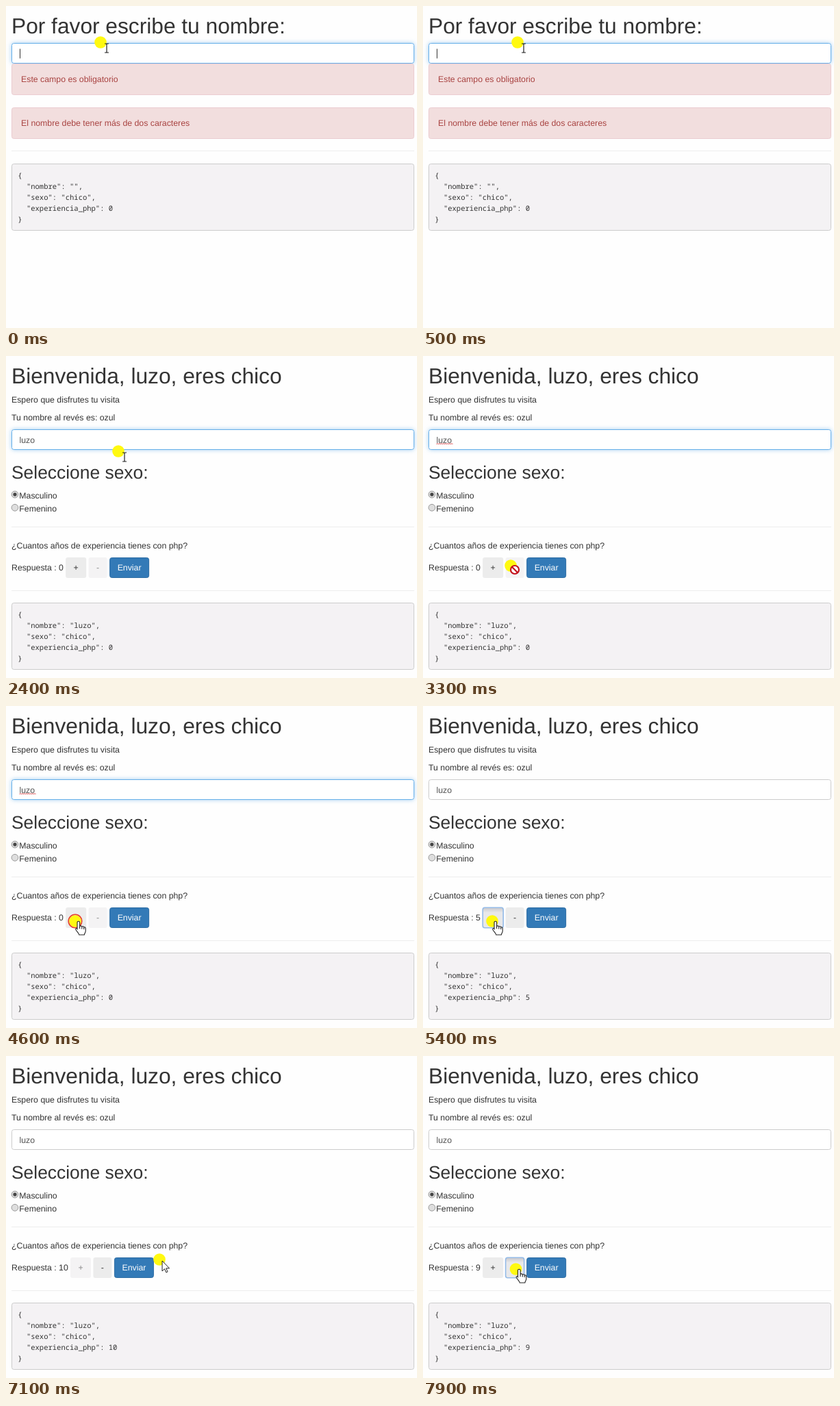
Animation of 600 by 470 pixels, one loop 8 s. Source, as an HTML page:

```html
<!DOCTYPE html>
<html lang="es">
<head>
<meta charset="utf-8">
<style>
  html, body { margin: 0; width: 100%; height: 100%; overflow: hidden; background: #fefefe; }
  svg { display: block; width: 600px; height: 470px; }
  text { font: 12.31px "Liberation Sans", Arial, sans-serif; fill: #333; white-space: pre; text-rendering: geometricPrecision; }
  .h1 { font-size: 31.7px; }
  .h2 { font-size: 26.4px; }
  .field { fill: #555; }
  .error { fill: #a94442; }
  .code { font: 10.52px "Noto Sans Mono", "DejaVu Sans Mono", monospace; }
  .glow { filter: drop-shadow(0 0 3px rgba(102, 175, 233, .6)); }
</style>
</head>
<body>
<svg id="stage" viewBox="0 0 600 470"></svg>
<script>
const LOOP = 8000, STEP = 100;
const stage = document.getElementById('stage');

// time, spot x, spot y, pointer shape from then on
const path = [
  [0, 138, 53, 'beam'], [2000, 138, 53, 'beam'], [2200, 146, 82, 'beam'],
  [2400, 164, 139, 'beam'], [2500, 185, 215, 'arrow'], [2650, 230, 330, 'arrow'],
  [2750, 239, 392, 'beam'], [2900, 197, 391, 'beam'], [3100, 160, 345, 'arrow'],
  [3300, 128, 306, 'no'], [3800, 138, 314, 'no'], [3900, 138, 314, 'no'],
  [4150, 112, 316, 'hand'], [4300, 101, 314, 'hand'], [6000, 101, 314, 'hand'],
  [6200, 100, 306.5, 'no'], [6300, 100, 306.5, 'no'], [6400, 135, 304, 'hand'],
  [6500, 168, 299, 'hand'], [6600, 168, 299, 'hand'], [6800, 238, 288, 'arrow'],
  [7100, 224, 297, 'arrow'], [7300, 160, 304, 'hand'], [7500, 137, 307, 'hand'],
  [7600, 135.5, 311, 'hand'], [8000, 135.5, 311, 'hand']
];

const text = (x, y, s, cls = '', more = '') => `<text x="${x}" y="${y}" class="${cls}" ${more}>${s}</text>`;
const box = (x, y, w, h, fill, line = 'none', more = '') =>
  `<rect x="${x}" y="${y}" width="${w}" height="${h}" rx="3" fill="${fill}" stroke="${line}" ${more}/>`;
const rule = y => `<path d="M8 ${y}H596" stroke="#eee"/>`;
const alertBox = (y, s) => box(8.5, y + .5, 587, 45, '#f2dede', '#ebccd1') + text(22.1, y + 27.2, s, 'error');

function input(y, name, t) {
  const focus = t < 4700, end = 19.5 + [0, 3, 10, 17, 24.5][name.length];
  let s = box(8.5, y + .5, 587, 29, '#fff', focus ? '#66afe9' : '#ccc', focus ? 'class="glow"' : '');
  s += text(19.5, y + 19.5, name, 'field');
  const sinceKey = t < 1600 ? 0 : t - 1600;
  if (t < 4100 && sinceKey % 1000 < 500)
    s += `<path d="M${Math.round(end) + .5} ${y + 8.5}v14" stroke="#333"/>`;
  if (focus && t >= 2600)
    s += `<path d="M19.5 ${y + 22}${'l1.5-1.5 1.5 1.5'.repeat(8)}" fill="none" stroke="#d8383c" stroke-width=".9"/>`;
  return s;
}

function code(y, name, years) {
  const lines = ['{', `  "nombre": "${name}",`, '  "sexo": "chico",', `  "experiencia_php": ${years}`, '}'];
  return box(8.5, y + .5, 587, 97, '#f4f2f4', '#ccc') +
    lines.map((l, i) => text(17.3, y + 21.2 + i * 15.85, l, 'code')).join('');
}

function button(x, y, w, label, off, focus) {
  let s = box(x, y, w, 30, off ? '#f4f3f4' : '#ececec');
  if (focus) s += box(x, y + .3, w, 29.4, 'url(#pressed)', '#94bbe8', 'stroke-width="1.6"');
  return s + text(x + w / 2, y + 19, label, '', `text-anchor="middle" opacity="${off ? .55 : 1}"`);
}

function radio(y, label, on) {
  return `<circle cx="13" cy="${y - 5.4}" r="4.9" fill="#dedede" stroke="#9a9a9a"/>` +
    (on ? `<circle cx="13" cy="${y - 5.4}" r="2.6" fill="#444"/>` : '') + text(19.3, y, label);
}

function form(d, years, t) {
  const x = years > 9 ? 94 : 87.2, y = 294 + d;
  return text(8, 178.9 + d, 'Seleccione sexo:', 'h2') +
    radio(207.5 + d, 'Masculino', true) + radio(226.7 + d, 'Femenino', false) +
    rule(249.5 + d) +
    text(8, 280.8 + d, '¿Cuantos años de experiencia tienes con php?') +
    text(8, 312.5 + d, 'Respuesta : ' + years) +
    button(x, y, 30, '+', years > 9, t >= 4700 && years < 10 && t < 6300) +
    button(x + 33.4, y, 27, '-', years < 1, t >= 7600) +
    box(x + 64.4, y + .5, 57, 29, '#337ab7', '#2e6da4') +
    text(x + 92.9, y + 19, 'Enviar', '', 'text-anchor="middle" style="fill:#fff"') +
    rule(342.5 + d);
}

function pointer(t) {
  const i = path.findIndex((p, k) => t >= p[0] && t < path[k + 1][0]);
  const [t0, x0, y0, shape] = path[i], [t1, x1, y1] = path[i + 1];
  const f = (t - t0) / (t1 - t0), x = x0 + (x1 - x0) * f, y = y0 + (y1 - y0) * f;
  const down = (t >= 4600 && t < 6200 && (t - 4600) % 165 < 85) || (t >= 7600 && t < 7800);
  const shapes = {
    beam: '<path transform="translate(9 8.5)" d="M-3-6.5h2q1 0 1 1 0-1 1-1h2M0-5.5V5.5M-3 6.5h2q1 0 1-1 0 1 1 1h2" fill="none" stroke="#222" stroke-width="1.2"/>',
    no: '<g transform="translate(6 6)" stroke="#c4101c" stroke-width="2.2"><circle r="6" fill="#fff"/><path d="M-4.2-4.2 4.2 4.2"/></g>',
    hand: '<path transform="translate(5 -.5)" d="M-2 2.5a1.8 1.8 0 0 1 3.6 0v5.5c1-1 3-.6 3.2.6 1-.8 2.6-.4 2.9.9 1.2-.6 2.5.2 2.5 1.6v4c0 2-1.6 3-1.9 5.4h-7.6c0-2-3.2-4.6-4.8-7.6-.8-1.6 1-2.6 2.1-1zM1.6 8v3.5M4.8 9v3M7.7 10v2.5" fill="#fff" stroke="#222" stroke-width="1.1"/>',
    arrow: '<path transform="translate(4 2)" d="M0 0v15l3.5-3.3 2.3 5.2 2.2-1-2.3-5h4.8z" fill="#fff" stroke="#222"/>'
  };
  return `<g transform="translate(${x} ${y})"><circle r="8.8" fill="#fff910"/>` +
    (down ? '<circle r="9.8" fill="none" stroke="#e8402c" stroke-width="1.6"/>' : '') + shapes[shape] + '</g>';
}

function draw(now) {
  const t = Math.floor(now % LOOP / STEP) * STEP;
  const name = 'luzo'.slice(0, [700, 1000, 1400, 1600].filter(k => t >= k).length);
  const years = t < 4700 ? 0 : t >= 7800 ? 9 : Math.min(10, 1 + Math.floor((t - 4700) / 165));
  const short = 'El nombre debe tener más de dos caracteres';
  let s = '<defs><linearGradient id="pressed" x2="0" y2="1"><stop stop-color="#c8c8cc"/><stop offset=".25" stop-color="#e8e8ea"/></linearGradient></defs>';
  if (!name) {
    s += text(8, 39.8, 'Por favor escribe tu nombre:', 'h1') + input(54, name, t) +
      alertBox(84, 'Este campo es obligatorio') + alertBox(148, short) + rule(211.5) + code(230, name, years);
  } else {
    const d = name.length < 3 ? 46 : 0;
    s += text(8, 39.8, `Bienvenida, ${name}, eres chico`, 'h1') +
      text(8, 67.6, 'Espero que disfrutes tu visita') +
      text(8, 94.2, 'Tu nombre al revés es: ' + [...name].reverse().join('')) +
      input(107, name, t) + (d ? alertBox(137, short) : '') + form(d, years, t) + code(360 + d, name, years);
  }
  stage.innerHTML = s + pointer(t);
  requestAnimationFrame(() => draw(performance.now() - start));
}

const start = performance.now();
draw(0);
</script>
</body>
</html>
```
